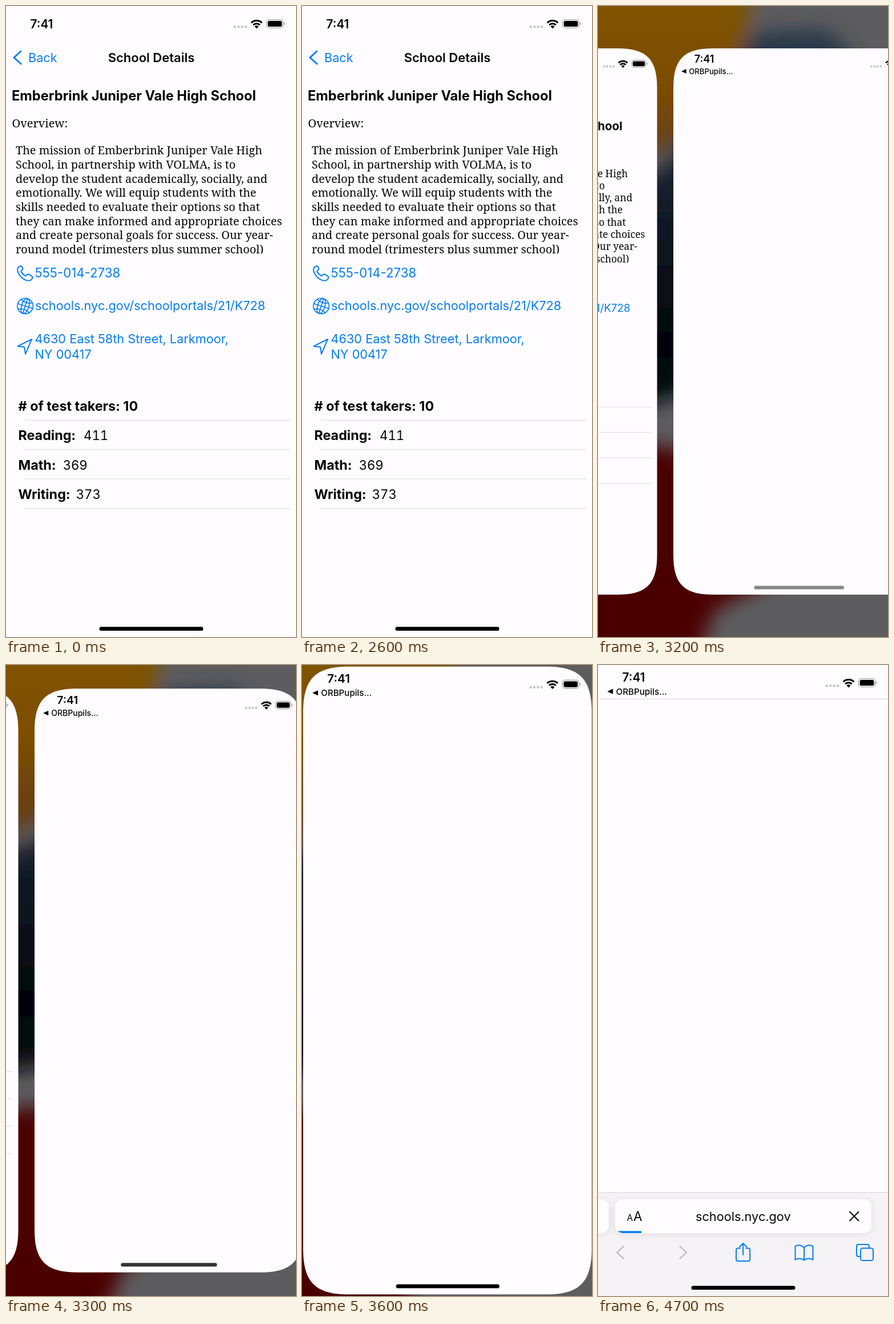
An HTML page for the animation above (5.1 s loop, 508 by 1102 pixels).

```html
<!DOCTYPE html>
<html lang="en">
<head>
<meta charset="utf-8">
<title>School details</title>
<style>
  html, body { margin: 0; width: 100%; height: 100%; overflow: hidden; background: #fefcff; }
  svg { display: block; width: 508px; height: 1102px; }
  text { font: 400 21.7px Inter, "Open Sans", sans-serif; fill: #060507; white-space: pre; }
  .semi { font-weight: 600; }
  .bold { font-weight: 700; font-size: 23.3px; }
  .serif text, text.serif { font: 400 19.9px "Noto Serif", Georgia, serif; }
  .num { font-size: 22.2px; font-variant-numeric: tabular-nums; }
  .clock { font-weight: 600; font-size: 20.8px; }
  text.blue { fill: #057cf3; }
  .line { fill: none; stroke-linecap: round; stroke-linejoin: round; stroke-width: 2; }
  .line.blue { stroke: #057cf3; }
  .rule { stroke: #dddcdf; stroke-width: 1.2; }
  .paper { fill: #fefcff; }
</style>
</head>
<body>
<svg viewBox="0 0 508 1102">
  <defs>
    <filter id="haze" x="-20%" y="-20%" width="140%" height="140%"><feGaussianBlur stdDeviation="17"/></filter>
    <filter id="soft" x="-20%" y="-40%" width="140%" height="180%">
      <feDropShadow dx="0" dy="2" stdDeviation="7" flood-color="#000" flood-opacity=".09"/>
    </filter>
    <linearGradient id="night" x1="0" y1="0" x2="0" y2="1">
      <stop offset="0" stop-color="#2a3b4c"/><stop offset=".48" stop-color="#111a25"/>
      <stop offset=".8" stop-color="#03050a"/><stop offset="1" stop-color="#090d16"/>
    </linearGradient>
    <linearGradient id="amber" x1="0" y1="0" x2="0" y2="1">
      <stop offset="0" stop-color="#805400"/><stop offset=".5" stop-color="#7e4e00"/><stop offset="1" stop-color="#5c351c"/>
    </linearGradient>
    <clipPath id="address"><rect x="30" y="933" width="449" height="59" rx="14"/></clipPath>
    <clipPath id="overview"><rect y="235" width="508" height="197.5"/></clipPath>
    <g id="status">
      <g fill="#c7c6c9">
        <rect x="398.5" y="34" width="4.4" height="4.6" rx="1.8"/><rect x="404.9" y="34" width="4.4" height="4.6" rx="1.8"/>
        <rect x="411.2" y="34" width="4.4" height="4.6" rx="1.8"/><rect x="417.6" y="34" width="4.4" height="4.6" rx="1.8"/>
      </g>
      <path d="M429.8 29.3A13.2 13.2 0 0 1 448.2 29.3M433.2 33.1A8.3 8.3 0 0 1 444.8 33.1" fill="none" stroke="#000" stroke-width="3.1"/>
      <path d="M439 39.4L435.5 35.8A5 5 0 0 1 442.5 35.8Z"/>
      <rect x="456.6" y="23.8" width="28.8" height="14.4" rx="4.4" fill="none" stroke="#a3a2a5" stroke-width="1.3"/>
      <rect x="458.7" y="25.9" width="24.6" height="10.2" rx="2.6"/>
      <path d="M487 28.6Q489 29.4 489 31T487 33.4Z" fill="#a3a2a5"/>
    </g>
  </defs>

  <g id="wallpaper">
    <rect width="508" height="1102" fill="#5d5c5f"/>
    <g filter="url(#haze)">
      <path fill="url(#night)" d="M-50 345L115 285L275 45L400 40L450 90L440 500L320 598L120 688L-50 722Z"/>
      <path fill="url(#amber)" d="M-60 -60H272L260 60L130 240L-60 320Z"/>
      <path fill="#4c0004" d="M-60 782L110 768L325 832L372 862L362 955L290 1012L205 1055L165 1160H-60Z"/>
    </g>
  </g>

  <g id="details">
    <path class="paper sheet"/>
    <text class="clock" x="42.5" y="38.5">7:41</text>
    <use href="#status"/>
    <path class="line blue" style="stroke-width:3" d="M26 79L14 90L26 101"/>
    <text class="blue" x="39" y="97.6">Back</text>
    <text class="semi" x="254.5" y="97.6" text-anchor="middle" style="font-size:22px">School Details</text>
    <text class="bold" x="10" y="165" style="font-size:23.6px">Emberbrink Juniper Vale High School</text>
    <text class="serif" x="10.5" y="212">Overview:</text>
    <g class="serif" clip-path="url(#overview)" id="mission"></g>

    <path class="line blue" d="M24.6 454.4C21 456 19.2 459.5 20.8 464.4C23.4 471.8 30 477.6 36.4 479.4C41 480.6 44.6 478.4 46.2 475.4C47 473.8 46.3 472.7 45 471.8L40.6 468.9C39.2 468 38 468.2 36.9 469.2L35.3 470.7C34.6 471.4 33.8 471.4 33 470.9C30.4 469.3 28.2 467 26.7 464.6C26.2 463.8 26.3 463 27 462.3L28.8 460.5C29.6 459.6 29.8 458.5 29.1 457.4L27.5 454.9C26.8 453.9 25.8 453.8 24.6 454.4Z"/>
    <text class="blue" x="50.5" y="474.4" style="font-size:22.2px">555-014-2738</text>
    <g id="link">
      <g class="line blue" style="stroke-width:1.7" transform="rotate(18 33.7 524)">
        <circle cx="33.7" cy="524" r="13.7"/><ellipse cx="33.7" cy="524" rx="6.4" ry="13.7"/>
        <path d="M33.7 510.3V537.7M20 524H47.4M23.5 515Q33.7 520.5 43.9 515M23.5 533Q33.7 527.5 43.9 533"/>
      </g>
      <text class="blue" x="51" y="531.4">schools.nyc.gov/schoolportals/21/K728</text>
    </g>
    <path class="line blue" d="M45 582L20.5 594.2L32.3 595.8L34 607.8Z"/>
    <text class="blue" x="50.5" y="589">4630 East 58th Street, Larkmoor,</text>
    <text class="blue" x="50.5" y="616">NY 00417</text>

    <text class="bold" x="21.5" y="706.6"># of test takers: 10</text>
    <text class="bold" x="21.5" y="758">Reading:</text><text class="num" x="136" y="758">411</text>
    <text class="bold" x="21.5" y="809.5">Math:</text><text class="num" x="99.5" y="809.5">369</text>
    <text class="bold" x="21.5" y="861">Writing:</text><text class="num" x="122.5" y="861">373</text>
    <path class="rule" d="M32 723.3H498M32 774.5H498M32 826H498M32 877.5H498"/>
    <rect class="home" x="163.5" y="1084.3" width="182" height="6.8" rx="3.4"/>
  </g>

  <g id="browser">
    <path class="paper sheet"/>
    <text class="clock" x="42.5" y="28.5">7:41</text>
    <path d="M16.3 46.2L26.2 41.6V50.8Z"/>
    <text x="31.5" y="51.6" style="font-size:15.2px;font-weight:500">ORBPupils...</text>
    <use href="#status"/>
    <g id="chrome">
      <path class="rule" d="M0 59.3H508"/>
      <rect y="921" width="508" height="181" fill="#f5f3f6"/>
      <path class="rule" style="stroke:#d3d2d5" d="M0 921.5H508"/>
      <g id="tabs">
        <rect class="paper" x="-430" y="933" width="449" height="59" rx="14" filter="url(#soft)"/>
        <rect class="paper" x="30" y="933" width="449" height="59" rx="14" filter="url(#soft)"/>
        <g id="page">
          <text x="50.5" y="971" style="font-size:15.5px">A</text><text x="62" y="971" style="font-size:22.5px">A</text>
          <text x="254.3" y="970.6" text-anchor="middle">schools.nyc.gov</text>
          <path class="line" stroke="#060507" d="M441 955L456.5 970.5M456.5 955L441 970.5"/>
          <g clip-path="url(#address)"><rect id="progress" x="30" y="988.4" height="4" rx="1" fill="#057cf3"/></g>
        </g>
      </g>
      <path class="line" stroke="#b7b6ba" d="M45 1015L33.2 1026L45 1037M143.2 1015L155 1026L143.2 1037"/>
      <path id="share" class="line" d="M249 1018.5H245.5Q242 1018.5 242 1022V1037.5Q242 1041 245.5 1041H262.7Q266.2 1041 266.2 1037.5V1022Q266.2 1018.5 262.7 1018.5H259.2M254.1 1030V1010.2M248 1016L254.1 1010L260.2 1016"/>
      <path class="line blue" d="M361 1017.5Q353.5 1010.5 345.5 1015V1038.8Q354 1034 361 1039.5Q368 1034 376.5 1038.8V1015Q368.5 1010.5 361 1017.5V1039"/>
      <path class="line blue" d="M460 1033H456.5Q453 1033 453 1029.5V1015.5Q453 1012 456.5 1012H471.5Q475 1012 475 1015.5V1018.5"/>
      <rect class="line blue" x="460" y="1018.5" width="22" height="21.5" rx="3.6"/>
    </g>
    <rect class="home" x="163.5" y="1084.3" width="182" height="6.8" rx="3.4"/>
  </g>
</svg>
<script>
const LOOP = 5100, WIDTH = 508, HEIGHT = 1102, GAP = 28.5, CORNER = 80;
const $ = id => document.getElementById(id);
const all = name => document.querySelectorAll(name);

const mission = [
  "The mission of Emberbrink Juniper Vale High",
  "School, in partnership with VOLMA, is to",
  "develop the student academically, socially, and",
  "emotionally. We will equip students with the",
  "skills needed to evaluate their options so that",
  "they can make informed and appropriate choices",
  "and create personal goals for success. Our year-",
  "round model (trimesters plus summer school)"
];
$("mission").innerHTML = mission
  .map((line, i) => `<text x="17" y="${259.4 + i * 24.62}">${line}</text>`).join("");

// time, left edge of the browser card, scale, home bar grey
const cards = [
  [3100, 333.7, .889, 174],
  [3200, 132, .8657, 132],
  [3300, 50, .925, 50],
  [3400, 19, .968, 0],
  [3500, 7, .987, 0],
  [3600, 2, .995, 0],
  [3700, .6, .998, 0],
  [3800, 0, 1, 0]
];
const fade = [[3700, .15], [3800, .5], [3900, .85], [4000, 1]];
const rest = [0, WIDTH + GAP, 1, 0];

const at = (table, t, before) => table.reduce((hit, row) => t >= row[0] ? row : hit, before);

function place(id, x, scale) {
  const y = (1 - scale) * HEIGHT / 2;
  $(id).setAttribute("transform", `translate(${x} ${y}) scale(${scale})`);
}

// card outline whose corners ease into the straight edges
function sheet(c) {
  const k = c * .73, e = c - k, w = WIDTH - 2 * c, h = HEIGHT - 2 * c;
  return `M${c} 0h${w}c${k} 0 ${c} ${e} ${c} ${c}v${h}c0 ${k} ${-e} ${c} ${-c} ${c}` +
    `h${-w}c${-k} 0 ${-c} ${-e} ${-c} ${-c}v${-h}c0 ${-k} ${e} ${-c} ${c} ${-c}Z`;
}

function draw(t) {
  const [, left, scale, grey] = at(cards, t, rest);
  place("browser", left, scale);
  place("details", left - GAP - WIDTH * scale, scale);
  const outline = sheet(scale < 1 ? CORNER : 0);
  all(".sheet").forEach(el => el.setAttribute("d", outline));
  all(".home").forEach(el => el.setAttribute("fill", `rgb(${grey},${grey},${grey})`));
  $("link").setAttribute("opacity", t >= 2400 && t < 2600 ? .76 : 1);
  $("chrome").setAttribute("opacity", at(fade, t, [0, 0])[1]);

  // the new tab settles while the page starts loading
  const step = Math.max(0, Math.min(6, Math.floor((t - 4100) / 100)));
  const slide = step === 6 ? 0 : 40 * .5 ** step;
  $("tabs").setAttribute("transform", `translate(${slide} 0)`);
  $("page").setAttribute("opacity", step ? 1 : 0);
  $("progress").setAttribute("width", 46 * (1 - (1 - step / 6) ** 2));
  $("share").setAttribute("stroke", step ? "#057cf3" : "#b7b6ba");
}

const start = performance.now();
function tick() {
  draw((performance.now() - start) % LOOP);
  requestAnimationFrame(tick);
}
tick();
</script>
</body>
</html>
```
